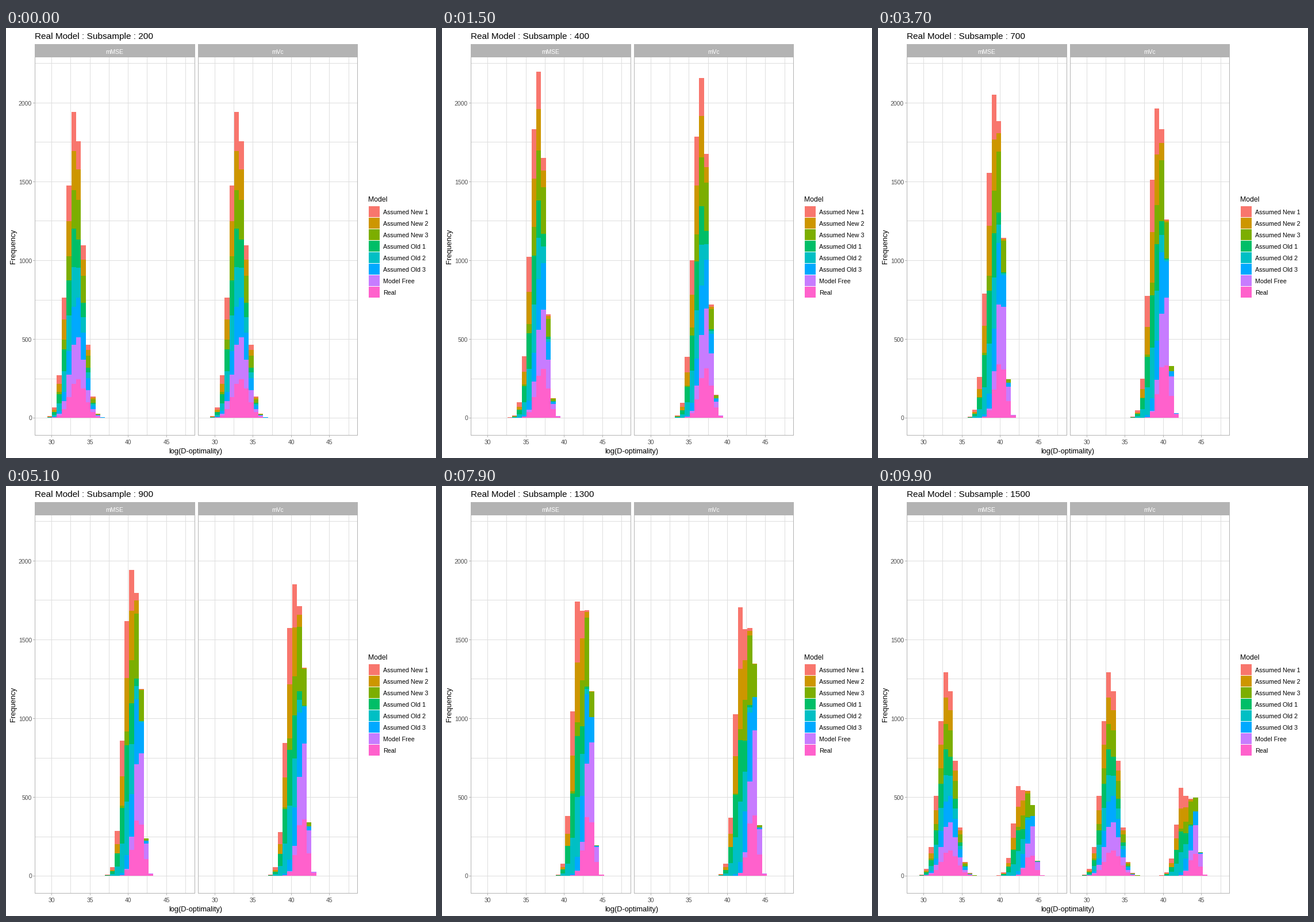
Write a matplotlib script that moves like this. It is 748 px wide and 748 px high and loops after 10 s.

```python
import math
import numpy as np
import matplotlib.pyplot as plt
from matplotlib.animation import FuncAnimation
from matplotlib.collections import PolyCollection
from matplotlib.patches import Rectangle

SIZE, DPI = 748, 100
FRAMES, INTERVAL = 100, 100
BINS, BIN_W = 30, 8.4
BAR_X = (63.3, 346.6)           # left edge of the first bin in each panel
PANELS = ((50, 328), (334, 611))
BASE, UNIT = 678, 0.274         # zero line and pixels per count
DRAWS = 1000                    # samples per model
GREY, GRID, TICK = "#B3B3B3", "#DEDEDE", "#4D4D4D"

MODELS = ["Assumed New 1", "Assumed New 2", "Assumed New 3", "Assumed Old 1",
          "Assumed Old 2", "Assumed Old 3", "Model Free", "Real"]
COLORS = ["#F8766D", "#CD9600", "#7CAE00", "#00BE67",
          "#00BFC4", "#00A9FF", "#C77CFF", "#FF61CC"]
SIZES = list(range(200, 1501, 100))

# Skewed bell curves in bin units, from the smallest to the largest subsample:
# mode, left spread, right spread, and the extra offset of the second panel.
FIRST = ((6.2, 21.65), (1.55, 1.27), (1.6, 0.65), 0.08)
SECOND = ((6.27, 21.97), (1.5, 1.27), (1.6, 0.65), -0.05)
THIRD = ((7.1, 23.7), (1.5, 1.08), (1.5, 0.58), 0.15)
FREE = ((7.15, 24.55), (1.4, 0.78), (1.45, 0.52), 0.2)
REAL = ((7.3, 24.15), (1.6, 1.02), (1.6, 0.78), 0.25)
CURVES = [FIRST, SECOND, THIRD] * 2 + [FREE, REAL]

erf = np.vectorize(math.erf)


def cdf(x, mode, left, right):
    """Two-piece normal distribution."""
    s = np.where(x < mode, left, right)
    return (left + s * erf((x - mode) / s / math.sqrt(2))) / (left + right)


def counts(curve, panel, n):
    mode, left, right, offset = curve
    u = math.log(n / SIZES[0]) / math.log(SIZES[-1] / SIZES[0])
    e = u ** 0.75
    center = mode[0] + (mode[1] - mode[0]) * u ** 0.97 + panel * offset * e
    sl, sr = (a * (b / a) ** e for a, b in (left, right))
    return np.round(DRAWS * np.diff(cdf(np.arange(BINS + 1), center, sl, sr)))


def stack(panel, n):
    """Cumulative counts, top model first, with a zero row at the end."""
    rows = np.array([counts(c, panel, n) for c in CURVES])
    return np.vstack([np.cumsum(rows[::-1], axis=0)[::-1], np.zeros(BINS)])


STACKS = np.array([[stack(p, n) for p in range(2)] for n in SIZES])


def timeline(frame):
    """State index and the share of the way to the next state."""
    for i in range(len(SIZES)):
        start = 4 + 8 * i if i < 3 else 28 + 7 * (i - 3)
        steps = 4 if i < 3 else 3
        if frame < start:
            return i, 0.0
        if frame < start + steps - 1:
            return i, (frame - start + 1) / steps
    return 0, 0.0


fig = plt.figure(figsize=(SIZE / DPI, SIZE / DPI), dpi=DPI, facecolor="white")
ax = fig.add_axes([0, 0, 1, 1])
ax.set_xlim(0, SIZE)
ax.set_ylim(SIZE, 0)
ax.axis("off")


def box(x, y, w, h, color, z=1):
    ax.add_patch(Rectangle((x, y), w, h, facecolor=color, linewidth=0,
                           antialiased=False, zorder=z))


def label(x, y, text, px, color="black", ha="left", **kw):
    kw.setdefault("va", "baseline")
    return ax.text(x, y, text, fontsize=px * 72 / DPI, color=color, ha=ha,
                   family="Liberation Sans", zorder=5, **kw)


def draw_panel(index, name):
    x0, x1 = PANELS[index]
    w = x1 - x0 + 1
    for i in range(10):
        box(x0, round(BASE + 0.2 - 68.55 * i), w, 1, GRID)
    for i in range(8):
        x = round(79.2 + 283.7 * index + 33.25 * i)
        box(x, 50, 1, 659, GRID)
        if i % 2 == 0:
            box(x, 709, 1, 3, GREY)
            label(x + 0.5, 724, str(30 + i * 5 // 2), 10.4, TICK, "center")
    box(x0, 28, w, 22, GREY)
    label((x0 + x1) / 2, 44.5, name, 10.3, "white", "center")
    for y in (50, 708):
        box(x0, y, w, 1, GREY, 4)
    for x in (x0, x1):
        box(x, 50, 1, 659, GREY, 4)


draw_panel(0, "mMSE")
draw_panel(1, "mVc")
for i in range(5):
    y = BASE - 137 * i
    box(47, y, 3, 1, GREY)
    label(45, y + 4.5, str(500 * i), 10.4, TICK, "right")
label(329.5, 740, "log(D-optimality)", 12.8, ha="center")
label(13, 379.5, "Frequency", 12.8, ha="center", va="center", rotation=90)

label(630, 302, "Model", 12.3)
for i, (name, color) in enumerate(zip(MODELS, COLORS)):
    y = round(310 + 20.05 * i)
    box(631, y, 19, 19, color)
    label(656.5, y + 14, name, 10.8)

title = label(50.5, 19, "", 15.35)
bars = [PolyCollection([], facecolors=color, linewidths=0,
                       antialiaseds=False, zorder=3) for color in COLORS]
for coll in bars:
    ax.add_collection(coll, autolim=False)

EDGES = [np.round(x + BIN_W * np.arange(BINS + 1)) for x in BAR_X]


def update(frame):
    i, t = timeline(frame)
    j = (i + 1) % len(SIZES)
    ys = np.round(BASE - UNIT * ((1 - t) * STACKS[i] + t * STACKS[j]))
    for m, coll in enumerate(bars):
        verts = []
        for p, e in enumerate(EDGES):
            for k in range(BINS):
                top, low = ys[p, m, k], ys[p, m + 1, k]
                if low > top:
                    verts.append([(e[k], top), (e[k + 1], top),
                                  (e[k + 1], low), (e[k], low)])
        coll.set_verts(verts)
    # The title never runs ahead across the end of the loop.
    shown = max(i, j) if t > 0.5 else i
    title.set_text(f"Real Model : Subsample : {SIZES[shown]}")
    return [*bars, title]


anim = FuncAnimation(fig, update, frames=FRAMES, interval=INTERVAL,
                     repeat=True, repeat_delay=0, blit=False)
plt.show()
```
